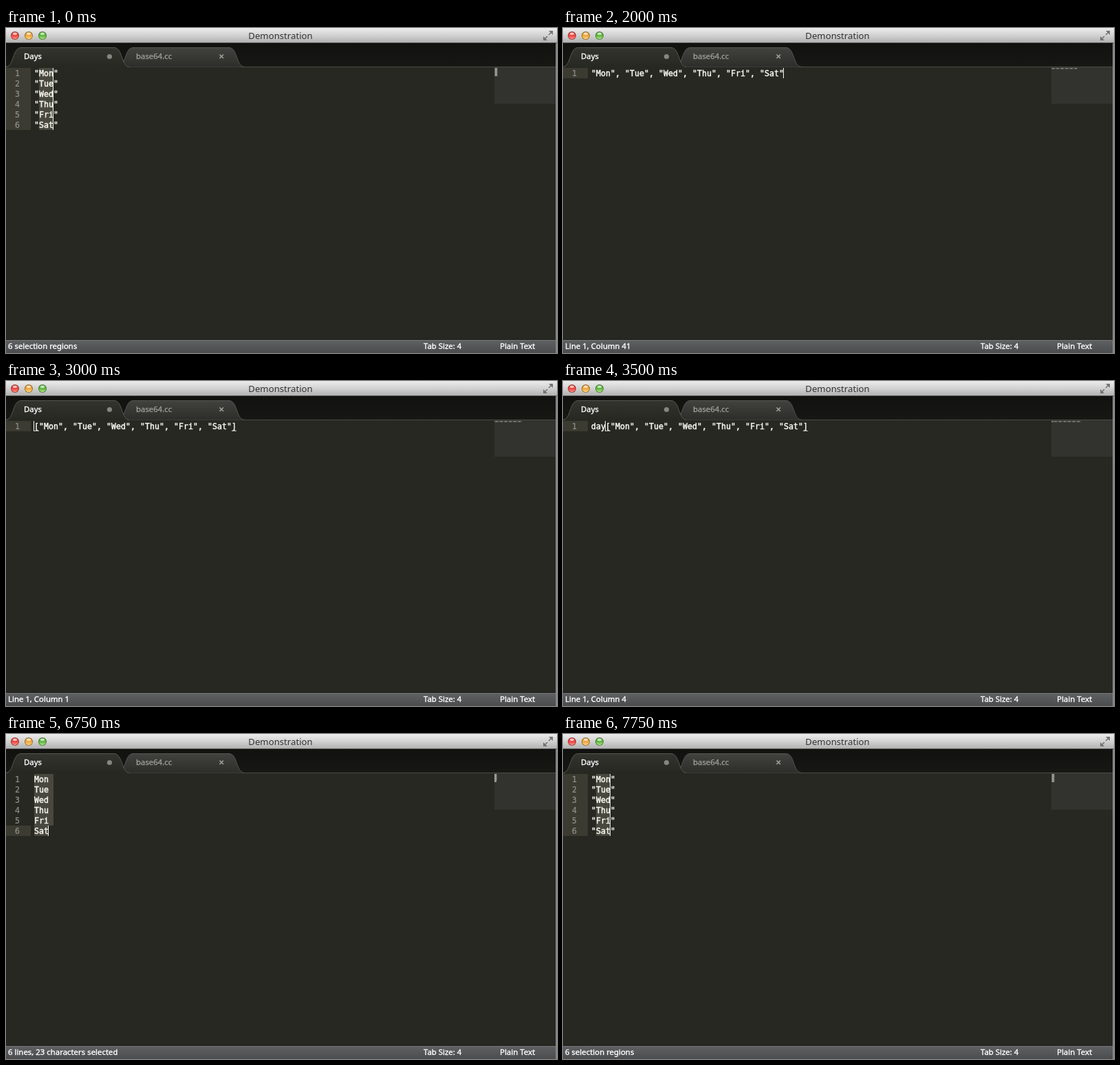
An HTML page with a canvas that plays this animation: 801x472 px, repeating every 8 s.

```html
<!DOCTYPE html>
<html lang="en">
<head>
<meta charset="utf-8">
<title>Demonstration</title>
<style>
html, body { margin: 0; width: 100%; height: 100%; overflow: hidden; background: #272822; }
canvas { display: block; width: 801px; height: 472px; }
</style>
</head>
<body>
<canvas id="stage" width="801" height="472"></canvas>
<script>
const ctx = document.getElementById('stage').getContext('2d');
const LOOP = 8000, LEFT = 41, TOP = 58, CELL = 7, ROW = 15;
const UI = '"Noto Sans", "Open Sans", sans-serif';
const MONO = '11.63px "DejaVu Sans Mono", "Noto Sans Mono", monospace';

const days = ['Mon', 'Tue', 'Wed', 'Thu', 'Fri', 'Sat'];
const quoted = days.map(d => `"${d}"`);
const list = quoted.join(', ');
const regions = '6 selection regions';
const perRow = (...cols) => days.map((_, row) => [row, ...cols]);

function typed(at, prefix) {
  const n = prefix.length;
  return {
    at, lines: [prefix + `[${list}]`], carets: [[0, n]],
    marks: [n, n + list.length + 1], status: `Line 1, Column ${n + 1}`
  };
}

const quotedRows = at => ({
  at, lines: quoted, sel: perRow(1, 4), carets: perRow(4), status: regions
});

const steps = [
  quotedRows(0),
  { at: 250, lines: quoted, carets: perRow(5), status: regions },
  { at: 500, lines: quoted.map(q => q + ','), carets: perRow(6), status: regions },
  { at: 1000, lines: [list + ','], carets: [7, 14, 21, 28, 35, 41].map(c => [0, c]), status: regions },
  { at: 1500, lines: [list + ','], carets: [[0, 41]], status: 'Line 1, Column 42' },
  { at: 2000, lines: [list], carets: [[0, 40]], status: 'Line 1, Column 41' },
  { at: 2250, lines: [list], sel: [[0, 0, 40]], carets: [[0, 40]], status: '40 characters selected' },
  { at: 2750, lines: [`[${list}]`], sel: [[0, 1, 41]], carets: [[0, 41]], status: '40 characters selected' },
  typed(3000, ''),
  typed(3250, 'd'),
  typed(3500, 'day'),
  typed(3750, 'days'),
  typed(4000, 'days = '),
  {
    at: 6750, lines: days, sel: days.map((_, r) => [r, 0, r < 5 ? 4 : 3]),
    carets: [[5, 3]], status: '6 lines, 23 characters selected'
  },
  { at: 7250, lines: days, sel: perRow(0, 3), carets: perRow(3), status: regions },
  quotedRows(7750)
];

function rect(x, y, w, h, fill) {
  ctx.fillStyle = fill;
  ctx.fillRect(x, y, w, h);
}

function fade(y0, y1, ...colors) {
  const g = ctx.createLinearGradient(0, y0, 0, y1);
  colors.forEach((c, i) => g.addColorStop(i / (colors.length - 1), c));
  return g;
}

function text(str, x, y, font, color, weight = 0) {
  ctx.font = font;
  ctx.fillStyle = ctx.strokeStyle = color;
  ctx.fillText(str, x, y);
  if (weight) {
    ctx.lineWidth = weight;
    ctx.strokeText(str, x, y);
  }
}

function label(str, x, y, color) {
  text(str, x, y, '11.4px ' + UI, color, 0.35);
}

function disc(x, y, r, fill) {
  ctx.beginPath();
  ctx.arc(x, y, r, 0, 7);
  ctx.fillStyle = fill;
  ctx.fill();
}

function line(color, width, ...points) {
  ctx.beginPath();
  points.forEach(([x, y]) => ctx.lineTo(x, y));
  ctx.strokeStyle = color;
  ctx.lineWidth = width;
  ctx.stroke();
}

function tab(x0, x1, fill, edge) {
  ctx.beginPath();
  ctx.moveTo(x0, 56.5);
  ctx.bezierCurveTo(x0 + 12, 55, x0 + 9, 28.5, x0 + 22, 28.5);
  ctx.lineTo(x1 - 22, 28.5);
  ctx.bezierCurveTo(x1 - 9, 28.5, x1 - 12, 55, x1, 56.5);
  ctx.fillStyle = fill;
  ctx.fill();
  ctx.strokeStyle = edge;
  ctx.lineWidth = 1;
  ctx.stroke();
}

function trafficLight(x, dark, mid, light) {
  disc(x, 11, 6, dark);
  disc(x, 11.3, 5, fade(6, 17, mid, mid, light));
  ctx.beginPath();
  ctx.ellipse(x, 8.2, 3, 1.8, 0, 0, 7);
  ctx.fillStyle = 'rgba(255,255,255,.65)';
  ctx.fill();
}

function arrow(x, y, dir) {
  line('#737373', 1.6, [x, y], [x - 5 * dir, y + 5 * dir]);
  ctx.beginPath();
  ctx.moveTo(x + dir, y - dir);
  ctx.lineTo(x - 5 * dir, y - dir);
  ctx.lineTo(x + dir, y + 5 * dir);
  ctx.fillStyle = '#737373';
  ctx.fill();
}

function drawFrame() {
  rect(0, 0, 801, 472, '#272822');

  rect(0, 0, 801, 21, fade(0, 21, '#ececec', '#d2d2d2', '#b2b2b2'));
  rect(0, 21, 801, 1, '#555');
  trafficLight(13, '#97342f', '#ee4a48', '#ff9d96');
  trafficLight(33, '#9a6a28', '#f0a93f', '#ffe28c');
  trafficLight(53, '#3f7a2c', '#62b945', '#c2f08f');
  ctx.textAlign = 'center';
  text('Demonstration', 399, 16, '13.2px ' + UI, '#333');
  ctx.textAlign = 'left';
  arrow(794, 5, 1);
  arrow(782, 17, -1);

  rect(0, 22, 801, 34, fade(22, 56, '#11120f', '#171814'));
  rect(0, 56, 801, 1, '#4b4c47');
  tab(163, 346, fade(28, 56, '#42433f', '#2d2e2a'), '#555651');
  tab(0, 179, fade(28, 56, '#33342e', '#272822'), '#55564f');
  rect(3, 56, 173, 2, '#272822');
  label('Days', 26, 45, '#fff');
  label('base64.cc', 189, 45, '#9b9b98');
  disc(150.5, 41.5, 3.6, '#858681');
  line('#a0a09c', 1.6, [310.5, 38.5], [316, 44]);
  line('#a0a09c', 1.6, [316, 38.5], [310.5, 44]);

  rect(710, 57, 89, 53, '#32332e');

  rect(0, 453, 801, 19, fade(453, 472, '#606163', '#4b4c4e'));
  rect(0, 452, 801, 1, '#1c1d19');
  rect(0, 453, 801, 1, '#747577');
  label('Tab Size: 4', 607, 466, '#fff');
  label('Plain Text', 718, 466, '#fff');
  rect(799, 22, 2, 450, '#858585');
}

function drawMap(lines, sel) {
  const scale = 0.94;
  for (const [row, from, to] of sel)
    rect(710 + from * scale, TOP + row * 2, (to - from) * scale, 2, '#696a62');
  lines.forEach((str, row) => [...str].forEach((ch, i) => {
    if (ch === ' ') return;
    const alpha = /\w/.test(ch) ? 0.5 : 0.28;
    rect(710 + i * scale, TOP + row * 2, scale, 1.6, `rgba(235,235,225,${alpha})`);
  }));
}

function drawEditor({ lines, sel = [], carets, marks = [], status }) {
  const colX = col => LEFT + col * CELL;
  const rowY = row => TOP + row * ROW;

  for (const row of new Set(carets.map(c => c[0])))
    rect(0, rowY(row), 36, ROW, '#3c3b31');
  for (const [row, from, to] of sel)
    rect(colX(from), rowY(row), (to - from) * CELL, ROW, '#49483e');

  lines.forEach((str, row) => {
    const base = rowY(row) + 12;
    text(String(row + 1), 13, base, MONO, '#8f908a', 0.2);
    [...str].forEach((ch, i) => {
      if (ch !== ' ') text(ch, colX(i), base, MONO, '#f8f8f2', 0.45);
      else if (sel.some(s => s[0] === row && i >= s[1] && i < s[2]))
        rect(colX(i) + 3, base - 4, 1, 1, '#85857a');
    });
  });

  for (const col of marks) rect(colX(col), TOP + 14, CELL, 1, '#c4c4bd');
  for (const [row, col] of carets) rect(colX(col) - 1, rowY(row), 1, ROW, '#f8f8f0');
  drawMap(lines, sel);
  label(status, 3, 466, '#fff');
}

function tick() {
  const t = performance.now() % LOOP;
  drawFrame();
  drawEditor(steps.findLast(s => s.at <= t));
  requestAnimationFrame(tick);
}
tick();
</script>
</body>
</html>
```
